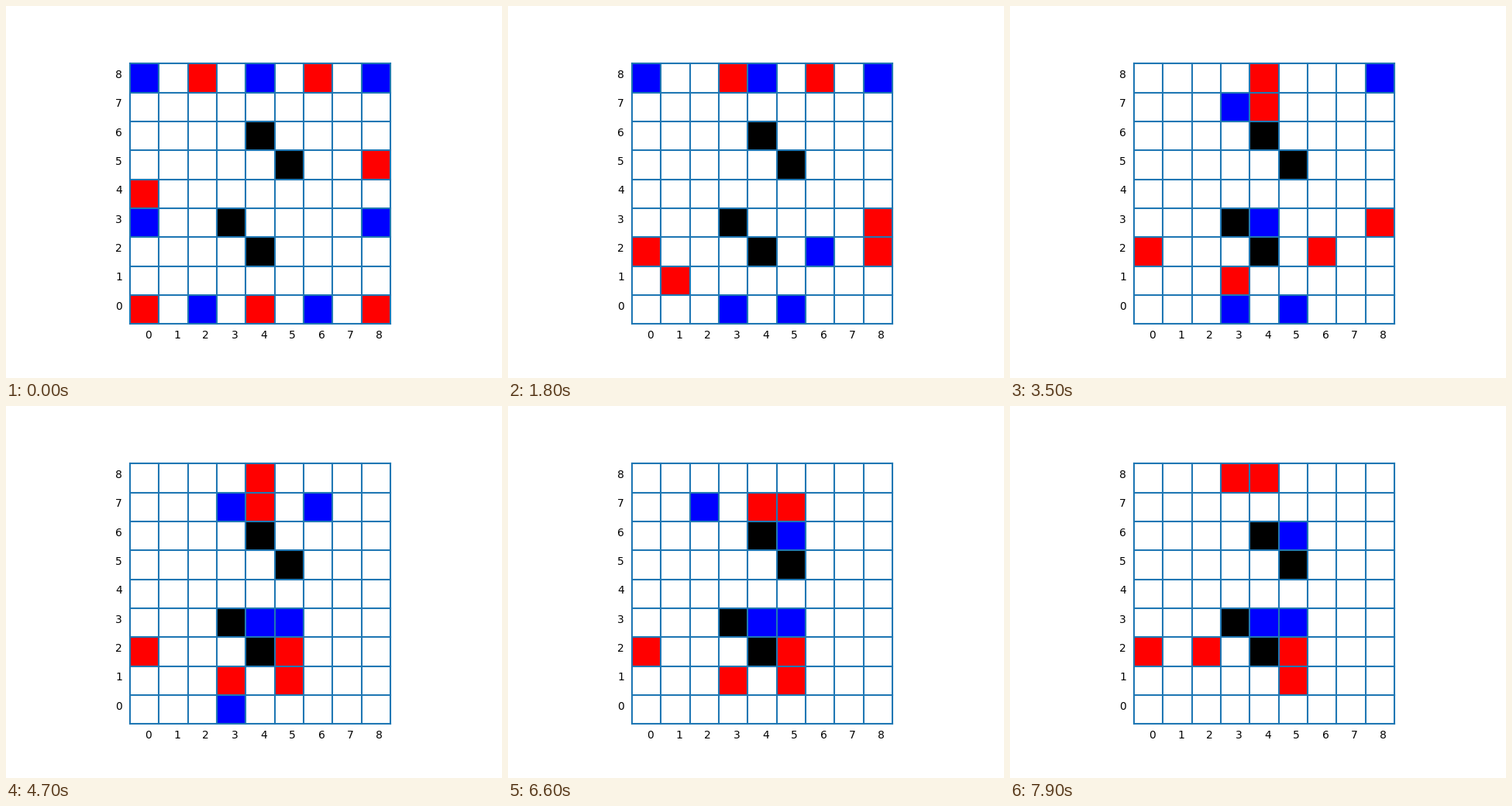
Animation, 640 px wide and 480 px high, one loop 8000 ms. Source, as a matplotlib script:

```python
import matplotlib.pyplot as plt
from matplotlib.animation import FuncAnimation
from matplotlib.patches import Rectangle

SIZE = 9
FRAMES = 80
STEP = {"L": (-1, 0), "R": (1, 0), "U": (0, 1), "D": (0, -1)}

START = {
    "black": "46 55 33 42",
    "red": "28 68 85 04 00 40 80",
    "blue": "08 48 88 03 83 20 60",
}
# Each run: starting cell (column, row), then one-cell steps.
RUNS = {
    "blue": "20R 60L 03RD 83LD 12DL 72LUL 08D 07RRR 53LUD 50UUU 88LLD "
            "67DL 53RLRL 30RU 37L 27URR 53RLRL",
    "red": "85D 80U 04DD 81U 84D 28R 00UR 68LLD 38R 11RR 82LL 83DL 62D "
           "72LL 61L 48RD 57UDUDUDUD 31LU 57U 47LU 58L",
}


def moves(runs):
    for run in runs.split():
        x, y = int(run[0]), int(run[1])
        for d in run[2:]:
            dx, dy = STEP[d]
            yield (x, y), (x + dx, y + dy)
            x, y = x + dx, y + dy


def flanked(board, cell, foe):
    x, y = cell
    return any(board.get((x - dx, y - dy)) == foe == board.get((x + dx, y + dy))
               for dx, dy in ((1, 0), (0, 1)))


def play(board, side, foe, move):
    """Move a piece and remove whatever ends up between two enemies."""
    board = dict(board)
    src, dst = move
    board[dst] = board.pop(src)
    for dx, dy in STEP.values():
        near = dst[0] + dx, dst[1] + dy
        far = dst[0] + 2 * dx, dst[1] + 2 * dy
        if board.get(near) == foe and board.get(far) == side:
            del board[near]
    if flanked(board, dst, foe):
        del board[dst]
    return board


def history():
    board = {(int(c[0]), int(c[1])): color
             for color, cells in START.items() for c in cells.split()}
    queues = {side: moves(runs) for side, runs in RUNS.items()}
    boards = [board]
    side, foe = "blue", "red"
    for _ in range(FRAMES - 1):
        board = play(board, side, foe, next(queues[side]))
        boards.append(board)
        side, foe = foe, side
    return boards


boards = history()

fig, ax = plt.subplots(figsize=(6.4, 4.8), dpi=100)
fig.subplots_adjust(left=0.125, right=0.9, bottom=0.11, top=0.88)
ax.set_aspect("equal")
ax.axis("off")
pad = SIZE * 0.05
ax.set_xlim(-pad, SIZE + pad)
ax.set_ylim(-pad, SIZE + pad)

cells = {}
for x in range(SIZE):
    for y in range(SIZE):
        cells[x, y] = ax.add_patch(Rectangle((x, y), 1, 1, lw=0, fc="white"))

for i in range(SIZE + 1):
    ax.plot([i, i], [0, SIZE], color="tab:blue", lw=1.5)
    ax.plot([0, SIZE], [i, i], color="tab:blue", lw=1.5)

for i in range(SIZE):
    ax.text(i + 0.5, -0.5, str(i), fontsize=10, family="DejaVu Sans")
    ax.text(-0.5, i + 0.5, str(i), fontsize=10, family="DejaVu Sans")


def update(n):
    for cell, patch in cells.items():
        patch.set_facecolor(boards[n].get(cell, "white"))
    return list(cells.values())


anim = FuncAnimation(fig, update, frames=FRAMES, interval=100,
                     repeat=True, repeat_delay=0, blit=False)
plt.show()
```
